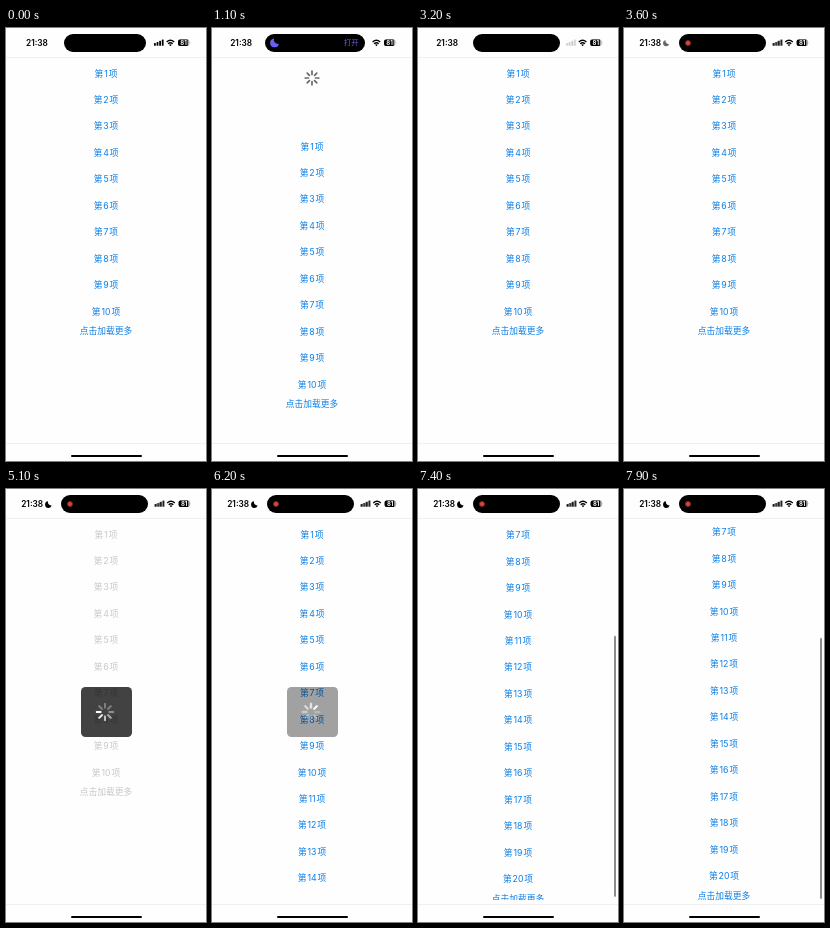
These frames come from a looping animation (200x433 px, 8 s). An HTML page:

```html
<!DOCTYPE html>
<html lang="zh">
<head>
<meta charset="utf-8">
<title>列表</title>
<style>
@property --scroll { syntax: "<number>"; inherits: true; initial-value: 0; }
html, body { margin: 0; width: 100%; height: 100%; overflow: hidden; background: #fff; }
#stage {
  position: relative; width: 200px; height: 433px; overflow: hidden; background: #fefefe;
  font-family: Inter, "Noto Sans CJK SC", "Noto Sans CJK", sans-serif;
  animation: scroll 8s linear infinite;
}
#stage div, #stage svg { position: absolute; }
#stage svg { overflow: visible; }
.rule { left: 0; width: 200px; height: 1px; background: #efefef; }
.home { left: 64.5px; top: 426.5px; width: 71px; height: 2.6px; border-radius: 2px; background: #000; }

/* status bar */
.time { left: 0; top: 9px; font: 600 8.3px/12px Inter, sans-serif; color: #000; white-space: nowrap; animation: time 8s ease-in-out infinite; }
.dnd { left: 38.6px; top: 11.6px; animation: dnd 8s linear infinite; }
.right { left: 0; top: 0; animation: right 8s linear infinite; }
.bars { animation: bars 8s linear infinite; }
.island { top: 5.5px; height: 18.7px; border-radius: 10px; background: #000; animation: island 8s ease-in-out infinite; }
.notice { left: 0; top: 0; animation: notice 8s linear infinite; }
.notice svg { left: 58px; top: 10.4px; }
.notice div { left: 132px; top: 9px; font-size: 7.2px; line-height: 12px; color: #6a5ff0; white-space: nowrap; }
.rec { left: 60.7px; top: 12px; width: 4.4px; height: 4.4px; border: .8px solid #7c2620; border-radius: 50%; background: #e0443a; animation: rec 8s linear infinite; }

/* list */
.view { left: 0; top: 34px; width: 200px; height: 377px; overflow: hidden; }
.list { left: 0; top: -34px; width: 200px; transform: translateY(calc(var(--scroll) * 1px)); animation: tint 8s step-end infinite; }
.list div { left: 0; width: 200px; text-align: center; font-size: 8.75px; line-height: 12px; white-space: nowrap; }
.list b { font-weight: 400; margin: 0 .9px; }
.late { animation: late 8s step-end infinite; }
.early { animation: early 8s step-end infinite; }
.thumb { left: 196.3px; top: 34px; width: 1.8px; height: 261px; border-radius: 1px; background: #8c8c8c; transform: translateY(calc(var(--scroll) * -.714px)); animation: thumb 8s step-end infinite; }

/* spinners */
.pull { left: 100px; top: 49.5px; }
.still { color: #6a6a6a; animation: still 8s linear infinite; }
.busy { color: #8a8a8a; animation: busy 8s linear infinite; }
.spin { animation: spin .8s steps(8) infinite; }
.modal { left: 74.7px; top: 197.5px; width: 51px; height: 50.7px; border-radius: 4.5px; background: rgba(0, 0, 2, .74); color: #fff; animation: modal 8s linear infinite; }
.turn { left: 24.8px; top: 25px; animation: turn 8s step-end infinite; }

@keyframes scroll {
  0%, 10.7% { --scroll: 0; }
  11.25% { --scroll: 4.5; }
  12.5% { --scroll: 40; }
  13.75% { --scroll: 73; }
  15% { --scroll: 84; }
  16.25%, 34.4% { --scroll: 86.5; }
  36.25% { --scroll: 50; }
  37.5% { --scroll: 22; }
  38.75% { --scroll: 7; }
  40%, 86.25% { --scroll: 0; }
  87.5% { --scroll: -96; }
  88.75% { --scroll: -127; }
  90% { --scroll: -144; }
  91.25% { --scroll: -153; }
  92.5% { --scroll: -158; }
  95%, 100% { --scroll: -161; }
}
@keyframes tint {
  0%, 35%, 76.2% { color: #0b7fe6; }
  16.2%, 53.7% { color: #c8c8c8; }
}
@keyframes late { 0% { opacity: 0; } 76.2%, 100% { opacity: 1; } }
@keyframes early { 0% { opacity: 1; } 76.2%, 100% { opacity: 0; } }
@keyframes thumb { 0% { opacity: 0; } 86.9%, 100% { opacity: 1; } }
@keyframes modal {
  0%, 15.6% { opacity: 0; }
  18.75%, 34.4% { opacity: 1; }
  37.5%, 52.8% { opacity: 0; }
  56.25%, 75.2% { opacity: 1; }
  79.8%, 100% { opacity: 0; }
}
@keyframes turn { 0% { transform: rotate(90deg); } 45%, 100% { transform: rotate(135deg); } }
@keyframes spin { to { transform: rotate(360deg); } }
@keyframes still {
  0%, 11.6% { opacity: 0; }
  13.6%, 15% { opacity: 1; }
  16.25%, 100% { opacity: 0; }
}
@keyframes busy {
  0%, 15% { opacity: 0; transform: rotate(180deg); }
  16.25%, 34.4% { opacity: 1; transform: rotate(180deg); }
  37.5%, 100% { opacity: 0; transform: rotate(180deg) scale(.5); }
}
@keyframes island {
  0%, 1% { left: 58px; width: 82px; }
  6.9%, 33.75% { left: 53px; width: 100px; }
  41%, 100% { left: 55px; width: 87px; }
}
@keyframes notice {
  0%, 4% { opacity: 0; }
  9%, 33.75% { opacity: 1; }
  36.5%, 100% { opacity: 0; }
}
@keyframes rec { 0%, 40% { opacity: 0; } 43.75%, 100% { opacity: 1; } }
@keyframes time {
  0%, 1% { transform: translateX(20px); }
  6.9%, 40% { transform: translateX(18.2px); }
  44.5%, 100% { transform: translateX(15.2px); }
}
@keyframes dnd {
  0%, 43% { opacity: 0; transform: scale(.6); }
  45% { opacity: .6; transform: scale(.9); }
  50%, 100% { opacity: 1; transform: none; }
}
@keyframes right { 0%, 38% { transform: none; } 44%, 100% { transform: translateX(.6px); } }
@keyframes bars {
  0%, 1% { opacity: 1; }
  5%, 39% { opacity: 0; }
  44%, 100% { opacity: 1; }
}
</style>
</head>
<body>
<div id="stage">
  <div class="view">
    <div class="list" id="list"></div>
  </div>
  <div class="thumb"></div>
  <div class="pull">
    <div class="still" id="still"></div>
    <div class="busy"><div class="spin" id="busy"></div></div>
  </div>
  <div class="modal"><div class="turn"><div class="spin" id="load"></div></div></div>
  <div class="rule" style="top:29px"></div>
  <div class="rule" style="top:415px"></div>
  <div class="home"></div>

  <div class="time">21:38</div>
  <div class="dnd"><svg width="7" height="7" viewBox="0 0 9.4 9.4"><path d="M4 .4A4.5 4.5 0 1 0 9 5.8A4.3 4.3 0 0 1 4 .4Z"/></svg></div>
  <div class="right">
    <svg width="200" height="30" viewBox="0 0 200 30">
      <g class="bars">
        <rect x="148" y="15" width="1.8" height="2.8" rx=".5"/>
        <rect x="150.6" y="14" width="1.8" height="3.8" rx=".5"/>
        <rect x="153.2" y="12.8" width="1.8" height="5" rx=".5"/>
        <rect x="155.8" y="11.6" width="1.8" height="6.2" rx=".5"/>
      </g>
      <g fill="none" stroke="#000" stroke-width="1.4">
        <path d="M160.6 13.9Q164.4 10.5 168.2 13.9"/>
        <path d="M162.1 15.7Q164.4 13.7 166.7 15.7"/>
      </g>
      <path d="M163 16.7Q164.4 15.7 165.8 16.7L164.4 18.2Z"/>
      <rect x="172" y="11.5" width="11.4" height="6.6" rx="2" fill="#a8a8a8"/>
      <path d="M174 11.5H181.6V18.1H174A2 2 0 0 1 172 16.1V13.5A2 2 0 0 1 174 11.5Z"/>
      <path d="M183.9 13.8Q184.9 14.8 183.9 15.8Z" fill="#a8a8a8"/>
      <text x="177.6" y="17" font-size="6" font-weight="700" fill="#fff" text-anchor="middle">81</text>
    </svg>
  </div>
  <div class="island"></div>
  <div class="notice">
    <svg width="9.4" height="9.4" viewBox="0 0 9.4 9.4"><path fill="#6a5ff0" d="M4 .4A4.5 4.5 0 1 0 9 5.8A4.3 4.3 0 0 1 4 .4Z"/></svg>
    <div>打开</div>
  </div>
  <div class="rec"></div>
</div>
<script>
const get = id => document.getElementById(id);
const STEP = 26.45;

const row = (y, html, cls = "") => `<div class="${cls}" style="top:${y - 6}px">${html}</div>`;

let rows = "";
for (let i = 1; i <= 20; i++) {
  rows += row(45.5 + (i - 1) * STEP, `第<b>${i}</b>项`, i > 10 ? "late" : "");
}
rows += row(303, "点击加载更多", "early") + row(303 + 10 * STEP, "点击加载更多", "late");
get("list").innerHTML = rows;

// Eight spokes; the brightest points up and the tail fades counterclockwise.
function spinner(id, inner, outer, width, low) {
  let lines = "";
  for (let i = 0; i < 8; i++) {
    const alpha = Math.max(low, 1 - i * 0.15);
    lines += `<line y1="${-inner}" y2="${-outer}" transform="rotate(${-45 * i})" opacity="${alpha}"/>`;
  }
  get(id).innerHTML =
    `<svg width="1" height="1" stroke="currentColor" stroke-width="${width}" stroke-linecap="round">${lines}</svg>`;
}
spinner("still", 3.6, 6.8, 1.7, 1);
spinner("busy", 3.6, 6.8, 1.7, 0.22);
spinner("load", 4.4, 8.2, 2.1, 0.32);
</script>
</body>
</html>
```
